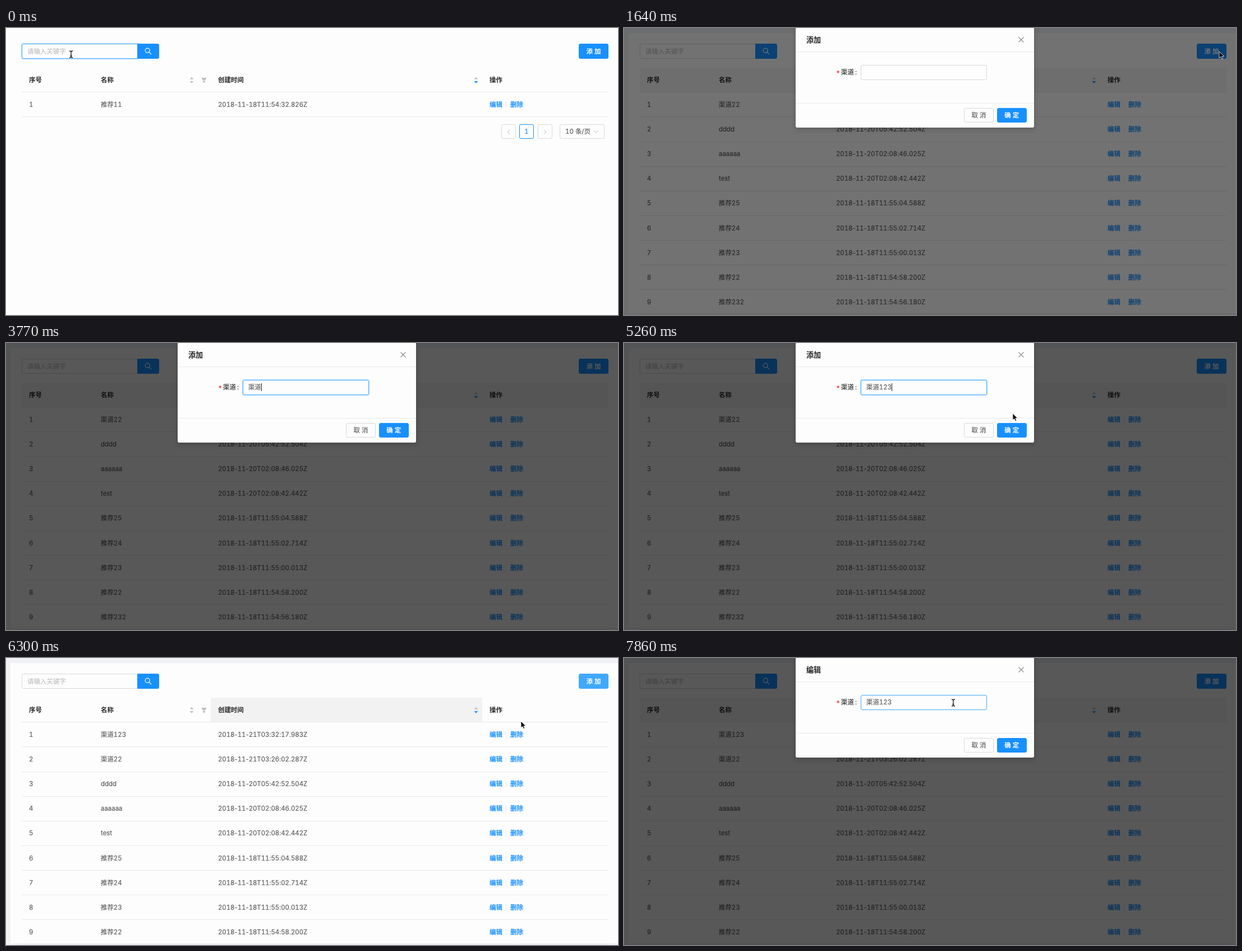
An HTML page that plays this animation: 1091x513 px, repeating every 8 s.

```html
<!DOCTYPE html>
<html lang="zh-CN">
<head>
<meta charset="utf-8">
<title>列表管理</title>
<style>
  html, body { margin: 0; width: 100%; height: 100%; overflow: hidden; background: #fdfdfd; }
  #stage {
    position: relative; width: 1091px; height: 513px; overflow: hidden; background: #fdfdfd;
    font: 11.44px/20px Inter, "Noto Sans CJK SC", "Noto Sans CJK", sans-serif;
    font-variant-numeric: tabular-nums; color: #595959; -webkit-text-stroke: .15px;
  }
  #stage * { position: absolute; box-sizing: border-box; white-space: pre; }
  #stage svg { overflow: visible; }
  #stage svg *, #stage .dash { position: static; }
  #stage.framed { background: #f0f2f5; }
  #panel { inset: 0; background: #fdfdfd; }
  .framed #panel { left: 8px; top: 9px; bottom: 3px; }
  #page, #rows, #pager { left: 0; top: 0; width: 1091px; height: 513px; }
  .strong { font-weight: 600; color: #262626; -webkit-text-stroke: 0; }
  .dark { color: #262626; }
  .star { color: #f5222d; }
  .time { letter-spacing: -.05px; }
  .dash { font-variant-numeric: normal; }
  .link { color: #1890ff; -webkit-text-stroke: .35px; }
  .link.hot { color: #40a9ff; }
  .line { background: #e8e8e8; height: 1px; }
  .btn { height: 26px; line-height: 25px; text-align: center; border: 1px solid #d9d9d9; border-radius: 3px; background: #fdfdfd; }
  .primary { color: #fff; font-weight: 600; background: #1890ff; border-color: #1890ff; -webkit-text-stroke: 0; }
  .primary.hot { background: #40a9ff; border-color: #40a9ff; }
  .btn.on { border-color: #1890ff; color: #1890ff; }
  .field { height: 27px; border: 1px solid #d9d9d9; border-radius: 3px; background: #fdfdfd; }
  .field.hot { border-color: #40a9ff; }
  .field.focus { border-color: #40a9ff; box-shadow: 0 0 0 1.6px rgba(24,144,255,.2); }
  #search { border-radius: 3px 0 0 3px; }
  #find { height: 27px; border-radius: 0 3px 3px 0; }
  #add { height: 27px; line-height: 26px; }
  .hint { color: #bfbfbf; }
  #head { left: 28px; top: 71px; width: 1046px; height: 43px; }
  .masked #head { background: #f5f5f5; }
  #thTime { left: 365px; top: 71px; width: 484px; height: 43px; background: #f2f2f3; }
  #mask { inset: 0; background: #000; }
  #modal { left: 306px; top: -1px; width: 425px; height: 178.5px; background: #fdfdfd; border-radius: 3px; box-shadow: 0 3px 10px rgba(0,0,0,.2); }
  #modalBody { left: -306px; top: 1px; }
  #title { left: 325px; top: 11px; font-size: 13.08px; }
  #history { left: 421px; top: 93px; width: 227px; background: #fff; border: 1px solid #ccc; border-radius: 3px; box-shadow: 0 2px 4px rgba(0,0,0,.25); color: #000; }
  #ime { left: 410px; top: 91px; height: 31px; background: #fcfcfc; box-shadow: 0 1px 4px rgba(0,0,0,.35); font-size: 12.8px; color: #444; }
  #ime .first { color: #f5821f; }
  #ime i { left: 1px; top: 5px; bottom: 3px; border-left: 2px dotted #c4c4c4; }
  #typed { left: 432px; top: 69px; }
  #typed * { position: static; }
  #typed span { text-decoration: underline; text-underline-offset: 2px; }
  #typed b { display: inline-block; width: 1px; height: 14px; background: #222; vertical-align: -3px; margin-right: -1px; }
</style>
</head>
<body>
<div id="stage"></div>
<script>
const stage = document.getElementById('stage');
const LOOP = 8000;

// Moments at which the picture may change
const STEPS = [0, 150, 300, 450, 600, 750, 900, 1050, 1200, 1340, 1490, 1640, 1790, 1960, 2140,
  2290, 2430, 2580, 2730, 2880, 3030, 3180, 3620, 3770, 4070, 4670, 4970, 5120, 5260, 5410, 5560,
  5710, 5860, 6010, 6160, 6300, 6480, 6620, 6760, 6910, 7060, 7210, 7360, 7510, 7680, 7860];

// ---- markup helpers ----
const text = (x, y, s, cls = '') => `<div class="${cls}" style="left:${x}px;top:${y - 10}px">${s}</div>`;
const box = (id, cls, x, y, w, s = '', more = '') =>
  `<div ${id && `id="${id}"`} class="${cls}" style="left:${x}px;top:${y}px;width:${w}px;${more}">${s}</div>`;
const icon = (x, y, d, style) =>
  `<svg width="1" height="1" style="left:${x}px;top:${y}px"><path d="${d}" style="${style}"/></svg>`;
const stroke = (color, w = 1) => `fill:none;stroke:${color};stroke-width:${w}`;
const sorter = (x, down) =>
  icon(x, 93, 'M-3.5-1.5L0-5.3 3.5-1.5Z', 'fill:#bfbfbf') +
  icon(x, 93, 'M-3.5 2L0 5.8 3.5 2Z', 'fill:' + down);
const line = (x, y, w) => box('', 'line', x, y, w);

const page = `
  <div id="head"></div><div id="thTime"></div>
  ${box('search', 'field', 28, 28, 207)}
  ${text(38, 42, '请输入关键字', 'hint')}
  ${box('find', 'btn primary', 234, 28, 39)}
  ${icon(253, 41, 'M2.2 2.2L6 6M3.2-.8A4 4 0 1 1-4.8-.8A4 4 0 1 1 3.2-.8', stroke('#fff', 1.2))}
  ${box('add', 'btn primary', 1021, 28, 53, '添 加')}
  ${text(41, 93, '序号', 'strong')}${text(169, 93, '名称', 'strong')}
  ${text(378, 93, '创建时间', 'strong')}${text(862, 93, '操作', 'strong')}
  ${sorter(331, '#bfbfbf')}${sorter(838, '#1890ff')}
  ${icon(353, 93, 'M-4.8-4H4.8L2 .5H-2ZM-2 1.5H2V4.5H-2Z', 'fill:#bfbfbf')}
  ${line(28, 114, 1046)}
  <div id="rows"></div>
  <div id="pager">
    ${box('', 'btn', 882.5, 172, 26)}${icon(895.5, 185.5, 'M2-3.5L-2 0 2 3.5', stroke('#bfbfbf'))}
    ${box('', 'btn on', 915, 172, 26, '1')}
    ${box('', 'btn', 948, 172, 26)}${icon(961, 185.5, 'M-2-3.5L2 0-2 3.5', stroke('#bfbfbf'))}
    ${box('', 'btn', 987, 172, 80)}${text(997, 185, '10 条/页')}
    ${icon(1052, 185, 'M-4-2L0 2.5 4-2', stroke('#bfbfbf'))}
  </div>`;

const modal = `
  <div id="modal"><div id="modalBody">
    <div id="title" class="strong"></div>
    ${icon(707.5, 21, 'M-4.5-4.5L4.5 4.5M4.5-4.5L-4.5 4.5', stroke('#8c8c8c', 1.1))}
    ${line(306, 42, 425)}${line(306, 134, 425)}
    ${text(378, 81, '*', 'star')}${text(387, 79, '渠道', 'dark')}${text(412, 79, ':', 'dark')}
    ${box('input', 'field', 421.5, 65.5, 225)}
    <div id="typed"></div>
    ${box('', 'btn', 606, 143, 53, '取 消')}
    ${box('ok', 'btn primary', 665, 143, 52.5, '确 定')}
  </div></div>`;

stage.innerHTML = `<div id="panel"></div><div id="page">${page}</div><div id="mask"></div>${modal}
  <div id="history"></div><div id="ime"></div>
  <svg id="cursor" width="1" height="1" style="left:0;top:0"></svg>`;

const el = {};
stage.querySelectorAll('[id]').forEach(n => { el[n.id] = n; });
const cache = {};
function fill(id, html) {
  if (cache[id] !== html) el[id].innerHTML = cache[id] = html;
}
const show = (id, on) => { el[id].style.display = on ? '' : 'none'; };
const mark = (id, cls, on) => el[id].classList.toggle(cls, on);

// ---- table ----
const FOUND = [['推荐11', '18T11:54:32.826']];
const ALL = [
  ['渠道22', '21T03:26:02.287'], ['dddd', '20T05:42:52.504'], ['aaaaaa', '20T02:08:46.025'],
  ['test', '20T02:08:42.442'], ['推荐25', '18T11:55:04.588'], ['推荐24', '18T11:55:02.714'],
  ['推荐23', '18T11:55:00.013'], ['推荐22', '18T11:54:58.200'], ['推荐232', '18T11:54:56.180']];
const GROWN = [['渠道123', '21T03:32:17.983'], ...ALL.slice(0, 8)];
const DASH = '<span class="dash">-</span>'; // tabular figures would widen it

function rowsHtml(list, lit, hotLink) {
  return list.map(([name, time], i) => {
    const y = 137 + i * 44.12, on = lit && i === 0;
    const back = on ? box('', '', 28, 115, 1046, '', 'height:43px;background:#e6f7ff') : '';
    return back + text(41, y, i + 1) + text(169, y, name) +
      text(378, y, ['2018', '11', time + 'Z'].join(DASH), 'time') +
      text(862, y, '编辑', on && hotLink ? 'link hot' : 'link') +
      box('', 'line', 891, Math.round(y) - 5, 1, '', 'height:11px') + text(899, y, '删除', 'link') +
      line(28, Math.round(y + 21.4), 1046);
  }).join('');
}

// ---- typing ----
const CARET = '<b></b>';
const compose = s => `<span>${s}</span>${CARET}`;
const TYPED = [[0, ''], [2290, CARET], [2580, compose('q')], [2730, compose('qu')], [2880, compose("qu'd")],
  [3030, compose("qu'da")], [3180, compose("qu'dao")], [3620, '渠道'], [3770, '渠道' + CARET],
  [4070, '渠道'], [4670, '渠道12' + CARET], [4970, '渠道123' + CARET], [6010, '渠道123']];
const BAG = '$'; // stands for the money bag candidate
const WORDS = [[0, ''], [2580, '去 请 前 钱 ' + BAG], [2730, '去 取 区 曲 趣'],
  [2880, '渠道 取得 去的 取到 去'], [3030, '渠道 取大 去打 取到 去'], [3180, '渠道 取道 去到 取到 去'], [3620, '']];
const HISTORY = ['q12', 'qweqweqwe', '推荐25', 'test', 'aaaaaa', 'dddd'];

const bagIcon = x =>
  icon(x, 15, 'M-2.5-6.5H2.5L1.6-3C5 0 6 6.5 3.5 7H-3.5C-6 6.5-5 0-1.6-3Z', 'fill:#c79a3c;stroke:#6b4d16;stroke-width:.8') +
  `<div style="left:${x - 3}px;top:7px;font-size:9px;color:#3d2b08;font-weight:600">$</div>`;

function imeHtml(words) {
  let x = 18, html = '<i></i>';
  words.split(' ').forEach((w, i) => {
    const bag = w === BAG;
    html += text(x, 15, `${i + 1}.${bag ? '' : w}`, i ? '' : 'first');
    if (bag) html += bagIcon(x + 20);
    x += w.length > 1 ? 46 : 33;
  });
  el.ime.style.width = x + 28 + 'px';
  const ax = x + 11;
  return html + icon(ax, 9.5, 'M-3.5 2L0-1.5 3.5 2', stroke('#fbd0ae', 1.2)) +
    icon(ax, 20.5, 'M-3.5-2L0 1.5 3.5-2', stroke('#f5821f', 1.2));
}

const historyHtml = list => list.map((s, i) => text(10, 21.5 + i * 28.5, s)).join('');

// ---- pointer ----
const SHAPES = {
  none: '',
  arrow: '<path d="M0 0V11.8L2.8 9.3 4.7 13.5 6.6 12.6 4.8 8.6H8.6Z" fill="#000" stroke="#fff" stroke-width=".8"/>',
  beam: ['#fff" stroke-width="2.4', '#111" stroke-width="1.3'].map(c =>
    `<path d="M-3-6Q0-6 0-4.2Q0-6 3-6M0-5V5M-3 6Q0 6 0 4.2Q0 6 3 6M-1.7 2.8H1.7" fill="none" stroke="${c}"/>`).join(''),
  hand: '<path d="M-2.8-5Q-1.8-6.6-.8-5L0-2.4Q1-3.4 1.9-2.2Q3-2.9 3.6-1.6Q5-1.8 5 0V2.6L3.8 6H-1.4L-4.6 1.4Q-5-.2-3.4 0L-2-1.2Z" fill="#fff" stroke="#000" stroke-width="1.1"/><path d="M.2 1.6V4M1.8 1.6V4M3.3 1.6V4" stroke="#000" stroke-width=".7"/>'
};
const POINTER = [[0, 'beam'], [450, 'hand'], [750, 'arrow'], [1340, 'hand'], [1640, 'arrow'], [2140, 'beam'],
  [2730, 'none'], [4970, 'beam'], [5260, 'arrow'], [5560, 'hand'], [6160, 'arrow'], [6760, 'hand'],
  [7210, 'arrow'], [7680, 'beam']];
const PATH = [[0, 116, 47], [150, 130, 47], [450, 252, 44], [600, 254, 44], [900, 520, 88], [1050, 760, 92],
  [1200, 960, 72], [1340, 1061, 42], [1640, 1061, 42], [2140, 479, 75], [4970, 479, 75], [5260, 693, 126],
  [5560, 690, 155], [6010, 690, 155], [6160, 810, 100], [6300, 918, 113], [6760, 868, 132.5],
  [7210, 868, 132.5], [7360, 800, 112], [7680, 587, 80], [LOOP, 587, 80]];

// ---- timeline ----
const held = (track, t) => track.filter(k => k[0] <= t).pop()[1];
const within = (t, a, b) => t >= a && t < b;
function along(t) {
  const i = PATH.findIndex(k => k[0] > t);
  const [t0, x0, y0] = PATH[i - 1], [t1, x1, y1] = PATH[i];
  const p = (t - t0) / (t1 - t0);
  return [x0 + (x1 - x0) * p, y0 + (y1 - y0) * p];
}
const ZOOM = [[0, 0], [1490, .625], [1640, 1], [6160, .35], [6300, 0], [7210, .625], [7360, 1]];
const SHADE = [[0, 0], [1490, .11], [1640, .55], [1790, .65], [6160, .3], [6300, 0], [7210, .11], [7360, .55], [7510, .65]];

function renderPage(t) {
  fill('rows', t < 600 ? rowsHtml(FOUND) :
    rowsHtml(t < 6300 ? ALL : GROWN, within(t, 6480, 7360), within(t, 6760, 7360)));
  show('pager', t < 600);
  show('thTime', within(t, 900, 1490) || within(t, 6160, 6480));
  mark('search', 'focus', t < 450);
  mark('search', 'hot', t < 1490);
  mark('find', 'hot', within(t, 450, 750));
  mark('add', 'hot', within(t, 1340, 1490) || within(t, 6160, 7060));
  stage.classList.toggle('framed', t >= 1490);
}

function renderModal(t) {
  const shade = held(SHADE, t), zoom = held(ZOOM, t), editing = t >= 7060;
  stage.classList.toggle('masked', shade > 0);
  el.mask.style.opacity = shade;
  show('modal', zoom > 0);
  el.modal.style.opacity = zoom;
  const [ox, oy] = editing ? [868, 133.5] : [1061, 42];
  el.modal.style.transformOrigin = `${ox - 306}px ${oy + 1}px`;
  el.modal.style.transform = zoom < 1 ? `scale(${.2 + .8 * zoom})` : 'none';
  fill('title', editing ? '编辑' : '添加');
  fill('typed', held(TYPED, t));
  mark('input', 'focus', within(t, 2290, 6010));
  mark('input', 'hot', t >= 7680 || within(t, 2140, 2290));
  mark('ok', 'hot', within(t, 5560, 6160));
}

function renderHints(t) {
  const words = held(WORDS, t);
  show('ime', words);
  if (words) fill('ime', imeHtml(words));
  const past = within(t, 2290, 2580) ? HISTORY : within(t, 2580, 2730) ? HISTORY.slice(0, 2) : [];
  show('history', past.length);
  el.history.style.height = 15 + past.length * 28.5 + 'px';
  fill('history', historyHtml(past));
}

function renderPointer(t) {
  const [x, y] = along(t);
  fill('cursor', SHAPES[held(POINTER, t)]);
  el.cursor.style.transform = `translate(${x}px,${y}px)`;
}

const start = performance.now();
function tick() {
  const now = (performance.now() - start) % LOOP;
  const t = STEPS.filter(s => s <= now).pop();
  [renderPage, renderModal, renderHints, renderPointer].forEach(draw => draw(t));
  requestAnimationFrame(tick);
}
tick();
</script>
</body>
</html>
```
